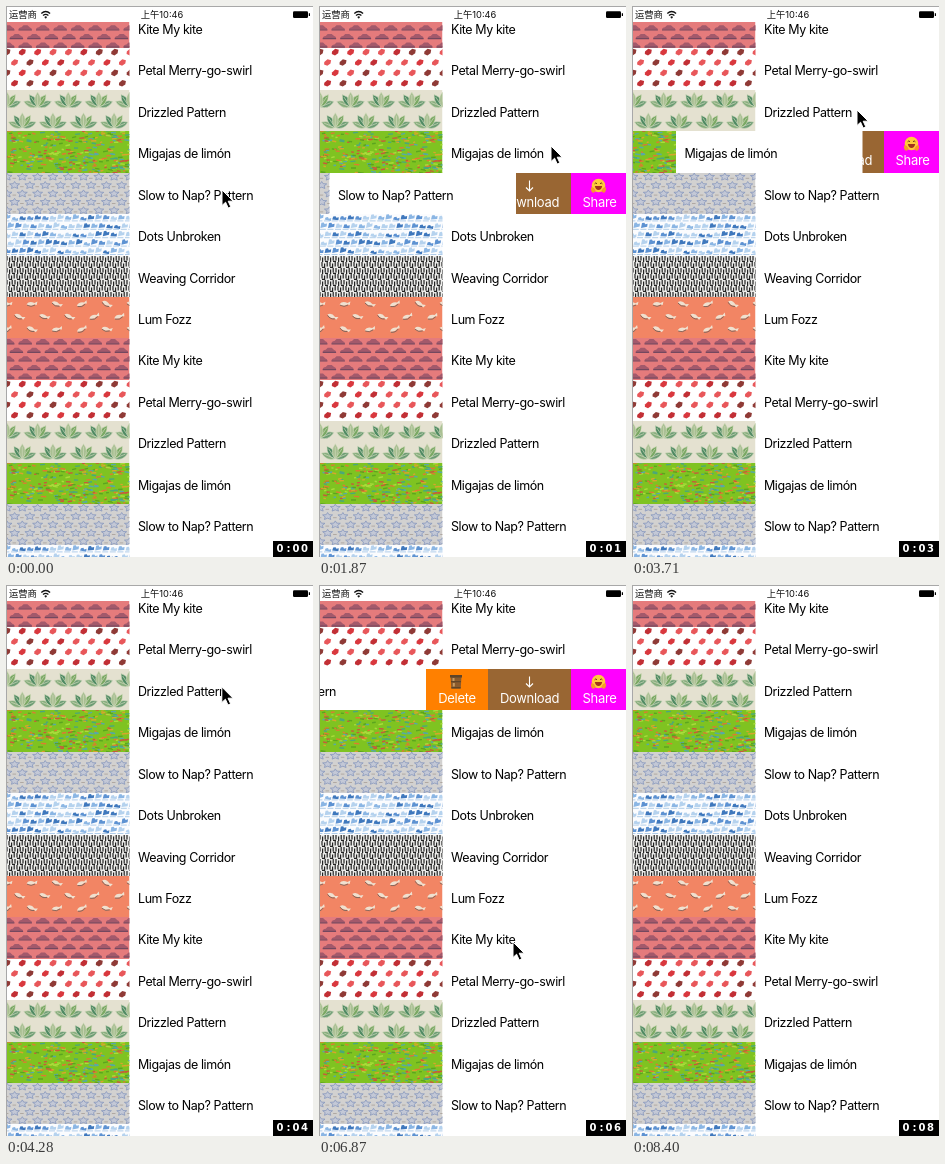
An HTML page that plays this animation: 307x551 px, repeating every 8.5 s.

```html
<!DOCTYPE html>
<html lang="en">
<head>
<meta charset="utf-8">
<title>Swipe list</title>
<style>
  html, body { margin: 0; width: 100%; height: 100%; overflow: hidden; background: #fff; }
  #stage { display: block; width: 307px; height: 551px; }
  text { font-family: Inter, "Noto Sans CJK SC", "Noto Sans CJK", sans-serif; }
  .title { font-size: 12.5px; letter-spacing: -.42px; fill: #000; }
  .label { font-size: 13px; letter-spacing: -.3px; fill: #fff; text-anchor: middle; }
  .status { font-size: 9.3px; fill: #111; }
  #clock { font: bold 10px "DejaVu Sans", sans-serif; fill: #fff; }
</style>
</head>
<body>
<svg id="stage" viewBox="0 0 307 551">
  <defs>
    <g id="actions">
      <path fill="#ff8000" d="M107 0h62v42h-62z"/>
      <path fill="#963" d="M169 0h83v42h-83z"/>
      <path fill="#f0f" d="M252 0h55v42h-55z"/>
      <g id="drum">
        <path fill="#8a5a2c" d="M131.5 7h11l-.8 12.5h-9.4z"/>
        <path fill="#5f4428" d="M131 6h12v2.4h-12zM132 12h10v1.2h-10zM132.4 18h9.2v1.6h-9.2z"/>
        <path fill="#c59a63" d="M133.5 9h2v3h-2zM133.8 14h2v3.5h-2z"/>
      </g>
      <path fill="none" stroke="#fff" stroke-width="1.1" d="M210.5 7.5v10.5M207 14.5l3.5 3.5 3.5-3.5"/>
      <g id="hug">
        <circle cx="279.5" cy="12.5" r="6.8" fill="#ffcb3c"/>
        <path fill="none" stroke="#6b3a10" d="M275.6 10.8q1.2-1.8 2.4 0M281 10.8q1.2-1.8 2.4 0"/>
        <path fill="#a3341c" d="M275.8 13h7.4q-.8 4-3.7 4t-3.7-4z"/>
        <path fill="#f59a2b" d="M272 14.5q2.6-1.2 4.6 3.2-1.4 2.8-3.6 1.6-1.6-1.8-1-4.8zM287 14.5q-2.6-1.2-4.6 3.2 1.4 2.8 3.6 1.6 1.6-1.8 1-4.8z"/>
      </g>
      <text class="label" x="138" y="33.6">Delete</text>
      <text class="label" x="210.5" y="33.6">Download</text>
      <text class="label" x="280.5" y="33.6">Share</text>
    </g>
  </defs>
  <rect width="307" height="551" fill="#fff"/>
  <g id="under"></g>
  <g id="rows"></g>
  <g id="bar">
    <rect width="307" height="16" fill="#fff"/>
    <text class="status" x="3" y="12">运营商</text>
    <g fill="none" stroke="#111" stroke-width="1.3">
      <path d="M35.3 7.4q4.4-3.8 8.8 0M37 9.5q2.7-2.3 5.4 0"/>
      <circle cx="39.7" cy="11.3" r=".5"/>
    </g>
    <text class="status" x="156" y="12" text-anchor="middle">上午10:46</text>
    <rect x="287" y="5.3" width="15" height="6.6" rx="1.2"/>
    <path d="M302.8 7.3h1.2v2.6h-1.2z"/>
  </g>
  <path fill="#a8a8a8" d="M0 0h307v1h-306v550h-1z"/>
  <rect x="267" y="535" width="40" height="16"/>
  <text id="clock" x="270.5 280.5 286.5 295" y="546.3"></text>
  <path id="cursor" stroke="#fff" stroke-width="1" d="M0 0V15.5L3.6 12.2 6.2 18 8.8 16.8 6.2 11.2H11.2Z"/>
</svg>
<script>
const LOOP = 8500, TICK = 116.3, LEAD = 18, SECOND = 1040;
const IMG_W = 122.5, ROWS = 14;
const $ = id => document.getElementById(id);
const rowY = i => Math.round(1 + 41.42 * i);

let seed = 7;
const rnd = () => (seed = seed * 16807 % 2147483647) / 2147483647;
const pick = list => list[Math.floor(rnd() * list.length)];
const fill = color => `<rect width="${IMG_W}" height="42" fill="${color}"/>`;

// Repeats a motif on a grid, every second line shifted.
function grid(dx, dy, shift, motif, y0 = 0) {
  let out = '';
  for (let r = 0, y = y0; y < 48; r++, y += dy)
    for (let x = (r % 2) * shift - dx; x < IMG_W + dx; x += dx)
      out += `<g transform="translate(${x.toFixed(1)} ${y.toFixed(1)})">${motif(r)}</g>`;
  return out;
}

const leaf = (angle, color) =>
  `<path transform="rotate(${angle})" fill="${color}" stroke="#d5dcc0" stroke-width=".6" d="M0 0q-6-7 0-15q6 8 0 15zM0-1v-11"/>`;

const art = {
  cars: () => fill('#e57b7c') + grid(17.5, 8.6, 8.7, () =>
    '<path fill="#a3596b" d="M-6 1.5q0-2.2 3-2.4l2-2h4l2.4 2.2q2 .2 2 2.2z"/>' +
    '<path stroke="#74485f" stroke-width="1.2" d="M-6 1.8h13.4"/>', 4),
  petals: () => fill('#fff') + grid(15.4, 10.4, 7.7, () =>
    `<path fill="${pick(['#d9383e', '#c22f35', '#e8575a', '#8f3a36'])}" d="M-3.4-.4l3.2-2.8 3.6 1-.6 3.4-3.2 2.2-3.2-1.4z"/>`, 4),
  leaves: () => fill('#e4e1d0') + grid(30.6, 20.7, 15.3, () =>
    leaf(-68, '#86ad7c') + leaf(68, '#6b9c73') + leaf(-34, '#4f8a63') +
    leaf(34, '#7aa864') + leaf(0, '#a8bf92'), 17),
  sticks: () => {
    let out = fill('#7fc321');
    for (let i = 0; i < 300; i++) {
      const x = rnd() * IMG_W, y = rnd() * 42, w = 2 + rnd() * 3.5;
      const color = pick(['#dd7a32', '#d7a52c', '#4aa77c', '#a9dc3a', '#5ba51f', '#c85a3a', '#57a9a6']);
      out += `<path stroke="${color}" stroke-width="1.4" d="M${x.toFixed(1)} ${y.toFixed(1)}l${w.toFixed(1)} ${(rnd() * 2 - 1).toFixed(1)}"/>`;
    }
    return out;
  },
  stars: () => fill('#d2d1d0') + grid(15.3, 8.4, 7.6, () =>
    '<path fill="#c3c8d6" stroke="#8797bd" stroke-width=".8" d="M0-3.4l1.4 2.2 3.6.2-2.6 2 .8 2.6-3.2-1.3-3.2 1.3.8-2.6-2.6-2 3.6-.2z"/>' +
    '<path stroke="#a79f97" stroke-width=".8" d="M5.5 1.8h3.6"/>', 3.5),
  strokes: () => fill('#fbfcfe') + grid(7.6, 8.4, 3.4, () => {
    const h = (2 + rnd() * 3.5).toFixed(1);
    return `<path fill="${pick(['#5d92d2', '#8bb6e4', '#3f78bd', '#b5d2ee'])}" d="M-3 2l1-${h} 2.4-.4 .8 1.6 2.4-.6-.4 3z"/>` +
      '<path stroke="#9dc0e4" stroke-width=".8" d="M-3.6 3.4h6"/>';
  }, 3.5),
  maze: () => fill('#ececea') + grid(8, 6, 2, r =>
    `<path fill="none" stroke="#222" stroke-width="1.2" d="M0 0v4.4M2.6 1.4v4.6M5.2 0v4.4M${r % 2 ? '0 5.4h3' : '5 5.4h3'}"/>`),
  fish: () => fill('#f28564') + grid(25, 12.6, 12.5, () =>
    `<g transform="rotate(${Math.round(rnd() * 60 - 25)})">` +
    '<path fill="#efe0cf" d="M-5.5 0q3-3.6 8-.8l3-1.4-.8 3.4-2.4-.6q-4 2.4-7.8-.6z"/>' +
    '<path fill="none" stroke="#75635c" stroke-width=".8" d="M-5 1q4 2.6 8 .2"/></g>', 7)
};

const kinds = [
  ['cars', 'Kite My kite'], ['petals', 'Petal Merry-go-swirl'],
  ['leaves', 'Drizzled Pattern'], ['sticks', 'Migajas de limón'],
  ['stars', 'Slow to Nap? Pattern'], ['strokes', 'Dots Unbroken'],
  ['maze', 'Weaving Corridor'], ['fish', 'Lum Fozz']
];

// Keys are [tick, value...].
const swipes = {
  2: [[50, 0], [56, -203], [64, -203], [69, 0]],
  3: [[19, 0], [23, -64], [25, -79.5], [32, -79.5], [36, 0]],
  4: [[1, 0], [9, -113], [16, -113], [20, 0]]
};
const pointer = [
  [1, 216, 184], [9, 100, 184], [13, 232, 141], [16, 232, 140], [19, 212, 145],
  [23, 143, 145], [25, 128, 145], [32, 225, 104], [35, 221, 102], [39, 188, 102],
  [40, 167, 102], [43, 167, 102], [45, 134, 102], [46, 150, 103], [48, 150, 103],
  [49, 160, 104], [50, 156, 105], [56, 40, 106], [59, 194, 357], [60, 194, 357],
  [65, 225, 520], [68, 236, 535], [69, 240, 570]
];

function at(keys, n) {
  if (n <= keys[0][0]) return keys[0].slice(1);
  const i = keys.findIndex(k => k[0] >= n);
  if (i < 0) return keys[keys.length - 1].slice(1);
  const a = keys[i - 1], b = keys[i];
  const u = (n - a[0]) / (b[0] - a[0]), e = u * u * (3 - 2 * u);
  return a.slice(1).map((v, j) => v + (b[j + 1] - v) * e);
}

function build() {
  const pictures = kinds.map(([name]) => art[name]());
  let rows = '', under = '';
  for (let i = 0; i < ROWS; i++) {
    const k = i % kinds.length, y = rowY(i), h = rowY(i + 1) - y;
    if (swipes[i]) under += `<use href="#actions" y="${y}"/>`;
    rows += `<g id="row${i}" transform="translate(0 ${y})"><rect width="310" height="${h}" fill="#fff"/>` +
      `<svg x="1" width="${IMG_W}" height="${h}" overflow="hidden">${pictures[k]}</svg>` +
      `<text class="title" x="132" y="27.2">${kinds[k][1]}</text></g>`;
  }
  $('under').innerHTML = under;
  $('rows').innerHTML = rows;
}

function draw(ms) {
  const t = ms % LOOP, n = Math.floor((t + LEAD) / TICK);
  for (const i in swipes)
    $('row' + i).setAttribute('transform', `translate(${at(swipes[i], n)[0].toFixed(2)} ${rowY(+i)})`);
  const [x, y] = at(pointer, n);
  $('cursor').setAttribute('transform', `translate(${x.toFixed(1)} ${y.toFixed(1)})`);
  $('clock').textContent = '0:0' + Math.floor(t / SECOND);
}

build();
const start = performance.now();
(function loop() {
  draw(performance.now() - start);
  requestAnimationFrame(loop);
})();
</script>
</body>
</html>
```
